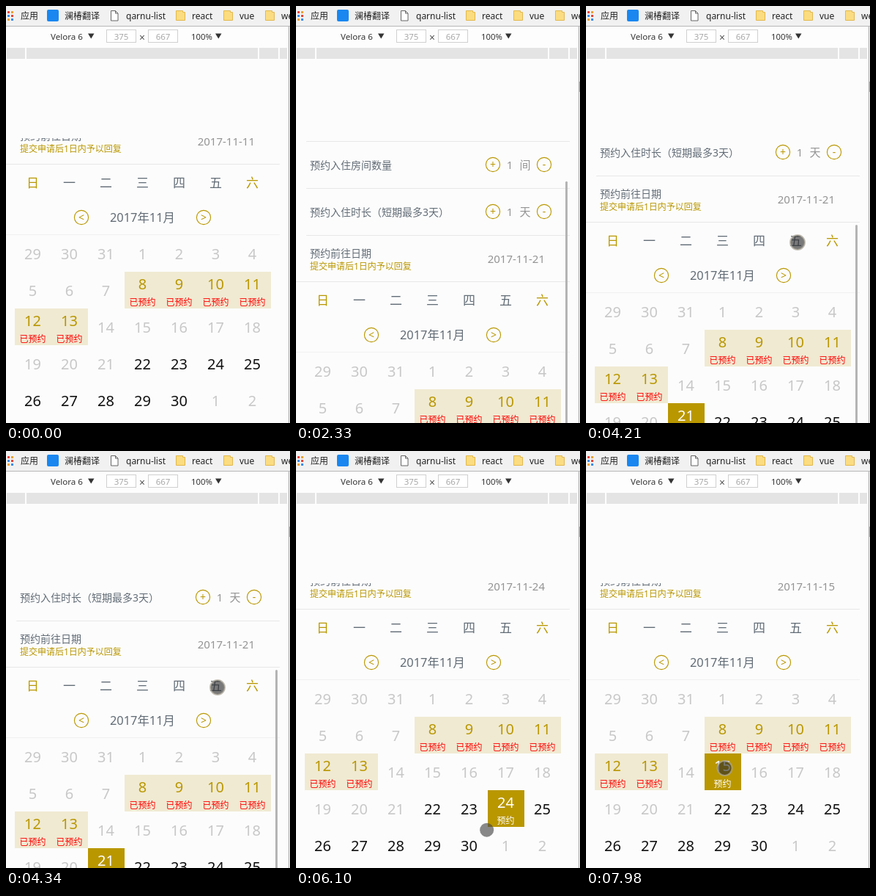
An HTML page that plays this animation: 388 px wide and 568 px high, repeating every 8000 ms.

```html
<!DOCTYPE html>
<html lang="zh-CN">
<head>
<meta charset="utf-8">
<title>预约日历</title>
<style>
  html, body { margin: 0; width: 100%; height: 100%; overflow: hidden; background: #fcfcfc; }
  svg { display: block; }
  text { font-family: "Noto Sans", "Noto Sans CJK SC", "Noto Sans CJK", sans-serif; white-space: pre; }
</style>
</head>
<body>
<svg width="388" height="568" viewBox="0 0 388 568">
  <defs><clipPath id="view"><rect y="180" width="386" height="388"/></clipPath></defs>
  <rect width="388" height="568" fill="#fcfcfc"/>
  <g clip-path="url(#view)">
    <g id="page"></g>
    <rect id="thumb" x="368" width="3" height="420" rx="1.5" fill="#b4b4b4"/>
  </g>
  <g id="bar"></g>
  <rect id="mark" x="387" y="103" width="1" height="14" fill="#b8b8b8"/>
  <circle id="dot"/>
</svg>
<script>
const NS = 'http://www.w3.org/2000/svg';
const [page, thumb, bar, mark, dot] =
  ['page', 'thumb', 'bar', 'mark', 'dot'].map(id => document.getElementById(id));
const GOLD = '#b99700', SLATE = '#626c76', GREY = '#949494', PALE = '#c8c8c8';

function set(node, attrs) {
  for (const k in attrs) node.setAttribute(k, attrs[k]);
  return node;
}
const add = (parent, tag, attrs) => parent.appendChild(set(document.createElementNS(NS, tag), attrs));
const box = (parent, x, y, width, height, fill, more) =>
  add(parent, 'rect', { x, y, width, height, fill, ...more });

// Text placed by its vertical centre
function label(parent, str, x, y, size, fill, anchor = 'start') {
  const t = add(parent, 'text', { x, y: y + size * 0.37, 'font-size': size, fill, 'text-anchor': anchor });
  t.textContent = str;
  return t;
}
function button(x, y, sign) {
  add(page, 'circle', { cx: x, cy: y, r: 9.6, fill: 'none', stroke: GOLD, 'stroke-width': 1.1 });
  label(page, sign, x, y, 14, GOLD, 'middle');
}

function buildBar() {
  box(bar, 0, 0, 388, 27, '#f1f1f1');
  box(bar, 0, 27, 388, 1, '#b8b8b8');
  box(bar, 0, 28, 386, 28, '#fdfdfd');
  const tints = ['#e8453c', '#f0a030', '#3b8be8'];
  for (let i = 0; i < 6; i++) box(bar, 2 + i % 2 * 5, 7 + (i >> 1) * 5, 3, 3, tints[i % 3]);
  label(bar, '应用', 20, 14, 12, '#222');
  box(bar, 56, 5, 16, 16, '#1a87f0', { rx: 2 });
  label(bar, '澜椿翻译', 80, 14, 12, '#222');
  add(bar, 'path', { d: 'M143.5 6.5h6l3.5 3.5v10h-9.5z M149.5 6.5v3.5h3.5', fill: '#fff', stroke: '#666' });
  label(bar, 'qarnu-list', 164, 14, 12, '#222');
  for (const [x, name] of [[254, 'react'], [319, 'vue'], [376, 'we']]) {
    add(bar, 'path', { d: `M${x - 21.5} 6.5h9v2h3v11h-12z`, fill: '#fbdc80', stroke: '#e3b94c' });
    label(bar, name, x, 14, 12, '#222');
  }

  label(bar, 'Velora 6', 61, 42, 11.6, '#333');
  label(bar, '100%', 253, 42, 11.3, '#333');
  for (const x of [112, 286]) add(bar, 'path', { d: `M${x} 37.5h8.5l-4.25 7z`, fill: '#333' });
  for (const [x, n] of [[137, '375'], [194, '667']]) {
    box(bar, x + .5, 32.5, 40, 17, '#fff', { stroke: '#d0d0d0' });
    label(bar, n, x + 20.5, 42, 11.5, '#a8a8a8', 'middle');
  }
  label(bar, '×', 186, 43, 14, '#555', 'middle');

  box(bar, 0, 56, 386, 17, '#fdfdfd');
  box(bar, 1, 57, 383, 15, '#e4e4e4');
  for (const x of [26, 344, 372]) box(bar, x, 57, 2, 15, '#fdfdfd');
  box(bar, 386, 28, 1, 540, '#a6a6a6');
}

const CELL = 50, LEFT = 12, TOP = 552;
const days = [];
let dateText;

function buildPage() {
  for (let i = 0; i < 5; i++) {
    const x = i % 4 ? 14 : 0;
    box(page, x, 200 + i * 64 - (i >> 2), 374 - x, 1, '#e8e8e8');
  }
  box(page, 0, TOP - 1, 374, 1, '#f1f1f1');

  [['选择户型', '室'], ['预约入住房间数量', '间'], ['预约入住时长（短期最多3天）', '天']].forEach(([name, unit], i) => {
    const y = 232 + i * 64;
    label(page, name, 19, y + 1, 14, SLATE);
    button(269, y, '+');
    label(page, '1', 292, y, 15, GREY, 'middle');
    label(page, unit, 313, y, 15, GREY, 'middle');
    button(339, y, '-');
  });
  label(page, '预约前往日期', 19, 417, 14, SLATE);
  label(page, '提交申请后1日内予以回复', 19, 435, 12, GOLD);
  dateText = label(page, '', 340, 424.4, 15, GREY, 'end');

  [...'日一二三四五六'].forEach((d, i) =>
    label(page, d, 36.5 + i * CELL, 481, 17, i % 6 ? SLATE : GOLD, 'middle'));
  button(103, 528, '<');
  label(page, '2017年11月', 186.5, 528, 16.4, SLATE, 'middle');
  button(270, 528, '>');

  for (let i = 0; i < 35; i++) {
    const nth = i - 2, inMonth = nth > 0 && nth < 31;
    const n = inMonth ? nth : nth < 1 ? nth + 31 : nth - 30;
    const x = LEFT + i % 7 * CELL, y = TOP + Math.floor(i / 7) * CELL;
    days.push({
      n, y,
      booked: nth > 7 && nth < 14,
      ink: inMonth && nth > 21 ? '#111' : PALE,
      cell: box(page, x, y, CELL, CELL, 'none'),
      num: label(page, n, x + 24.5, y, 20, PALE, 'middle'),
      tag: label(page, '', x + 24.5, y + 42, 12, '#f00', 'middle')
    });
  }
}

let shown;
function choose(index) {
  if (index === shown) return;
  shown = index;
  dateText.textContent = '2017-11-' + (index < 0 ? 11 : days[index].n);
  days.forEach((d, i) => {
    const on = i === index;
    set(d.cell, { fill: on ? GOLD : d.booked ? '#f0ead2' : 'none' });
    set(d.num, { fill: on ? '#fff' : d.booked ? GOLD : d.ink, y: d.y + (on || d.booked ? 24.4 : 33.4) });
    set(d.tag, { fill: on ? '#fff' : '#f00' });
    d.tag.textContent = on ? '预约' : d.booked ? '已预约' : '';
  });
}

const LOOP = 8000, STEP = 140, GONE = 770, BACK = 1670;
const bursts = [1940, 3060, 4210, 4770, 5730, 6880, 7980];
const wheel = [1940, 2500, 4210], NOTCH = 80;
// Pointer way points: time, x, y, and whether it presses there
const path = [
  [3060, 245, 562], [3940, 286, 298], [4210, 289, 322, true], [4490, 289, 324], [4770, 276, 338],
  [5050, 293, 412], [5730, 295, 480, true], [6150, 238, 540, true], [6570, 240, 488, true],
  [6880, 300, 480.5, true], [7440, 238, 436, true], [7980, 189.5, 432, true]
];

const clamp = p => Math.max(0, Math.min(1, p));
const smooth = p => p * p * (3 - 2 * p);

// The picture refreshes in steps within each burst of motion
function hold(t) {
  const from = bursts.filter(b => b <= t).pop();
  return from ? t - (t - from) % STEP : t;
}
function scrollAt(t) {
  if (t < BACK) return NOTCH * 3;
  return wheel.reduce((sum, w) => t < w ? sum : sum + NOTCH * smooth(clamp((t - w + 20) / 300)), 0);
}
function pointer(t) {
  const i = Math.max(0, path.filter(k => k[0] <= t).length - 1);
  const a = path[i], b = path[i + 1] || a;
  const p = clamp((t - a[0]) / (b[0] - a[0] || 1)) ** 1.25;
  return [a[1] + (b[1] - a[1]) * p, a[2] + (b[2] - a[2]) * p];
}
function selected(t) {
  let index = t < BACK ? -1 : 23;
  for (const [time, x, y, press] of path) {
    if (!press || time > t) continue;
    const row = Math.floor((y + scrollAt(time) - TOP) / CELL);
    if (row >= 0) index = row * 7 + Math.floor((x - LEFT) / CELL);
  }
  return index;
}

function render(t) {
  const h = hold(t), scroll = scrollAt(h);
  choose(selected(h));
  set(page, {
    transform: `translate(0 ${-Math.round(scroll)})`,
    visibility: t >= GONE && t < BACK ? 'hidden' : 'visible'
  });
  const fade = Math.max(...wheel.map(w => h < w ? 0 : clamp((w + 720 - h) / 200)));
  set(thumb, { y: 180 + scroll * 0.733, opacity: fade });
  set(mark, { opacity: t < 500 ? 0 : 1 });

  const [cx, cy] = pointer(h);
  const down = path.some(k => k[3] && h >= k[0] && h < k[0] + STEP);
  set(dot, {
    cx, cy, r: down ? 10 : 9.5,
    visibility: t < path[0][0] ? 'hidden' : 'visible',
    fill: down ? 'rgba(40,40,40,.62)' : 'rgba(70,70,70,.64)',
    stroke: down ? 'rgba(175,170,155,.7)' : 'none',
    'stroke-width': 2
  });
}

buildBar();
buildPage();
const start = performance.now();
function frame() {
  render((performance.now() - start) % LOOP);
  requestAnimationFrame(frame);
}
frame();
</script>
</body>
</html>
```
